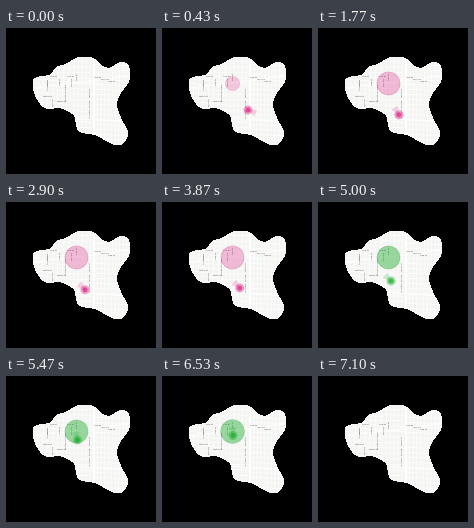
Animation, 150 px wide and 146 px high, one loop 7.31 s. Source, as a matplotlib script:

```python
import numpy as np
import matplotlib.pyplot as plt
from matplotlib.animation import FuncAnimation
from matplotlib.collections import LineCollection
from matplotlib.patches import Circle, PathPatch, Wedge
from matplotlib.path import Path

W, H, DPI = 150, 146, 100
STEP, FRAMES = 34, 215
PX = 72 / DPI

PINK = np.array([222, 40, 135]) / 255
GREEN = np.array([28, 172, 44]) / 255
GREY = np.array([90, 90, 90]) / 255

fig = plt.figure(figsize=(W / DPI, H / DPI), dpi=DPI, facecolor="black")
ax = fig.add_axes([0, 0, 1, 1])
ax.set_xlim(0, W)
ax.set_ylim(H, 0)
ax.axis("off")


def smooth_loop(points):
    """Closed Catmull-Rom curve through the points."""
    p = np.array(points, float)
    tangent = (np.roll(p, -1, 0) - np.roll(p, 1, 0)) / 6
    verts, codes = [p[0]], [Path.MOVETO]
    for i in range(len(p)):
        j = (i + 1) % len(p)
        verts += [p[i] + tangent[i], p[j] - tangent[j], p[j]]
        codes += [Path.CURVE4] * 3
    return Path(verts, codes)


# City area
outline = [(27.5, 53), (33, 49), (44, 47), (51, 39.5), (60, 36.5),
           (69, 31), (78, 29), (88, 31), (96, 38), (104, 40),
           (115, 34.5), (122.5, 39), (122.5, 53), (113.5, 66), (110.5, 78),
           (115, 91), (121.5, 106), (112, 117), (90, 107), (73, 102.5),
           (68, 87), (55, 80), (39, 79.5), (29.5, 67)]
land = PathPatch(smooth_loop(outline), facecolor="#f4f4f2",
                 edgecolor="none", antialiased=False)
ax.add_patch(land)


def streets(lines, width):
    roads = LineCollection(lines, colors="white", linewidths=width * PX, zorder=2)
    ax.add_collection(roads)
    roads.set_clip_path(land)


def grid(x0, x1, y0, y1, dx, dy, skew):
    lines = [[(x + skew, y0), (x - skew, y1)] for x in np.arange(x0, x1, dx)]
    lines += [[(x0, y - skew), (x1, y + skew)] for y in np.arange(y0, y1, dy)]
    return lines


streets(grid(27, 64, 30, 82, 5, 4.5, 1.5), 0.7)
streets(grid(64, 88, 28, 118, 4, 5.5, 0.3), 0.7)
streets(grid(88, 124, 32, 118, 3.6, 5, 0.6), 0.7)
streets([[(87.5, 28), (87.5, 118)]], 2.2)
streets([[(27, 60), (124, 48)], [(64, 90), (124, 94)]], 1.2)

# Street names, far too small to read
names = ["North St", "Mill Rd", "Hill Lane", "Low St", "Park Rd", "Oak St"]


def label(x, y, name, turn):
    ax.text(x, y, name, rotation=turn, fontsize=2.1 * PX, color="#505050",
            family="DejaVu Sans", ha="center", va="center", zorder=3)


rng = np.random.default_rng(5)
for i in range(12):
    x, y = 40 + 2.6 * i + rng.uniform(-3, 3), rng.uniform(47, 74)
    label(x, y, names[i % len(names)], 90 if i % 3 else 0)
for i in range(3):
    label(84.5, 65 + 10 * i, names[i], 90)
    label(92 + 7 * i, 49 + 2 * i, names[i + 3], 0)

# Moving parts
zone = Circle((70.5, 55.5), 11.5, linewidth=0.6 * PX, zorder=4)
beam = Wedge((0, 0), 8.5, 0, 50, linewidth=0, zorder=5)
halo = Circle((0, 0), 4.5, linewidth=0, zorder=6)
core = Circle((0, 0), 2.5, linewidth=0, zorder=7)
for part in (zone, beam, halo, core):
    ax.add_patch(part)


def progress(t, start, end):
    return min(max((t - start) / (end - start), 0), 1)


def ease_in_out(p):
    return p * p * (3 - 2 * p)


def ease_out(p):
    return 1 - (1 - p) ** 3


# start, end, x, y, heading (degrees, clockwise from right), easing
legs = [(690, 1100, 82.4, 86, 0, ease_in_out),
        (1590, 2000, 79, 87.8, -260, ease_in_out),
        (2590, 2900, 79, 87.8, -135, ease_in_out),
        (3690, 4270, 73, 79, -135, ease_in_out),
        (5260, 5770, 71, 59.5, -92, ease_out)]


def pose(t):
    state = np.array([86, 82, 22], float)
    for start, end, *goal, ease in legs:
        state += (np.array(goal) - state) * ease(progress(t, start, end))
    return state


def tint(t):
    p = ease_out(progress(t, 4675, 5000))
    color = PINK + (GREEN - PINK) * p
    return color + (GREY - color) * 0.6 * np.sin(np.pi * p)


def zone_scale(t):
    """Pops in, then swells slightly before shrinking away."""
    p = progress(t, 6525, 6670)
    grow = np.sin(np.pi / 2 * progress(t, 370, 500))
    return grow * max(1 - (2.7 * p ** 3 - 1.7 * p ** 2), 0)


def dot_scale(t):
    return ease_out(progress(t, 20, 200)) * (1 - progress(t, 6985, 7085))


def draw(i):
    t = (i + 0.5) * STEP
    x, y, heading = pose(t)
    color = tint(t)
    green = progress(t, 4675, 5000)

    size = zone_scale(t)
    fade = 0.6 + 0.4 * progress(t, 370, 500)
    zone.set_visible(size > 0.01)
    zone.set_radius(11.5 * size)
    zone.set_facecolor((*color, (0.3 + 0.14 * green) * fade))
    zone.set_edgecolor((*color * 0.85, 0.35 * fade ** 2))

    size = dot_scale(t) if t > STEP else 0
    for part, radius, alpha in ((beam, 8.5, 0.2), (halo, 4.5, 0.42), (core, 2.5, 0.7)):
        part.set_visible(size > 0.01)
        part.set_radius(radius * size)
        part.set_facecolor((*color, alpha))
    for part in (beam, halo, core):
        part.set(center=(x, y))
    beam.set_theta1(heading - 25)
    beam.set_theta2(heading + 25)
    return zone, beam, halo, core


anim = FuncAnimation(fig, draw, frames=FRAMES, interval=STEP,
                     repeat=True, repeat_delay=0, blit=False)
plt.show()
```
